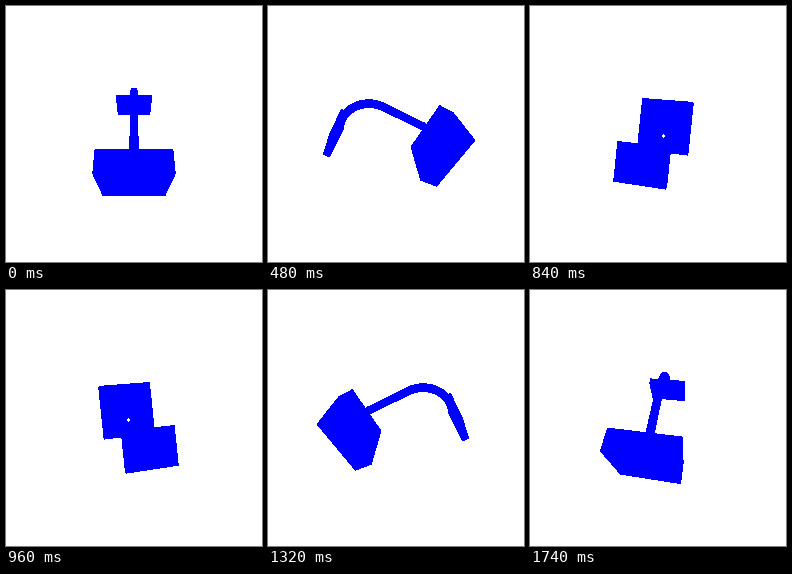
These frames come from a looping animation (256x256 px, 1.8 s). An HTML page:

```html
<!DOCTYPE html>
<html lang="en">
<head>
<meta charset="utf-8">
<title>Turning handle</title>
<style>
  html, body { margin: 0; width: 100%; height: 100%; overflow: hidden; background: #fff; }
  svg { display: block; width: 100vw; height: 100vh; }
</style>
</head>
<body>
<svg viewBox="0 0 256 256" shape-rendering="crispEdges" fill="#00f">
  <path id="block"/>
  <circle id="hole" fill="#fff"/>
  <path id="paddle"/>
  <g id="pipe" stroke="#00f" stroke-linecap="round"></g>
</svg>
<script>
const STEP = 60, STEPS = 30;
const RAD = Math.PI / 180;
const TILT = 30 * RAD, PERSPECTIVE = 0.0045, CENTER = 128;
const PIPE_RADIUS = 4, BEND = 28.2;
const $ = id => document.getElementById(id);

// Points are [depth, height, side]; depth faces the viewer at angle 0.
function project([u, w, v], angle) {
  const c = Math.cos(angle), s = Math.sin(angle);
  const x = v * c + u * s, near = u * c - v * s;
  const y = w * Math.cos(TILT) - near * Math.sin(TILT);
  const z = near * Math.cos(TILT) + w * Math.sin(TILT);
  const scale = 1 / (1 - PERSPECTIVE * z);
  return { x: CENTER + x * scale, y: CENTER - y * scale, scale };
}

// A box whose long side leans at 60 degrees in the depth/height plane.
function box(u, w, length, thickness, width) {
  const c = Math.cos(60 * RAD), s = Math.sin(60 * RAD);
  const corners = [];
  for (const i of [-0.5, 0.5]) for (const j of [-0.5, 0.5]) for (const k of [-0.5, 0.5]) {
    const along = i * length, across = j * thickness;
    corners.push([u + along * c - across * s, w + along * s + across * c, k * width]);
  }
  return corners;
}

function hull(points) {
  const sorted = [...points].sort((a, b) => a.x - b.x || a.y - b.y);
  const half = list => {
    const out = [];
    for (const p of list) {
      while (out.length > 1) {
        const a = out[out.length - 2], b = out[out.length - 1];
        if ((b.x - a.x) * (p.y - a.y) - (b.y - a.y) * (p.x - a.x) > 0) break;
        out.pop();
      }
      out.push(p);
    }
    return out.slice(0, -1);
  };
  return [...half(sorted), ...half(sorted.reverse())];
}

// A straight rod, a quarter bend, and a short end inside the paddle.
function pipePoints() {
  const points = [], start = [42, -1.4], bendStart = [-12, 29.8];
  for (let i = 0; i < 8; i++) {
    points.push(start.map((p, k) => p + (bendStart[k] - p) * i / 8));
  }
  const cu = bendStart[0] - BEND * 0.5, cw = bendStart[1] - BEND * 0.866;
  for (let i = 0; i <= 18; i++) {
    const a = (60 + i * 5) * RAD;
    points.push([cu + BEND * Math.cos(a), cw + BEND * Math.sin(a)]);
  }
  const [u, w] = points[points.length - 1];
  points.push([u - 3, w - 5.2]);
  return points.map(([u, w]) => [u, w, 0]);
}

const block = box(44.65, -14.9, 61.2, 20, 60);
const paddle = box(-58.3, 6, 31, 6.5, 41);
const pipe = pipePoints();
const segments = pipe.slice(1).map(() =>
  $('pipe').appendChild(document.createElementNS('http://www.w3.org/2000/svg', 'line')));

function drawBox(id, corners, angle) {
  const outline = hull(corners.map(p => project(p, angle)));
  $(id).setAttribute('d', 'M' + outline.map(p => p.x.toFixed(2) + ' ' + p.y.toFixed(2)).join('L') + 'Z');
}

function setAll(node, values) {
  for (const name in values) node.setAttribute(name, values[name]);
}

function draw(time) {
  const angle = Math.floor(time / STEP) % STEPS * 360 / STEPS * RAD;
  drawBox('block', block, angle);
  drawBox('paddle', paddle, angle);

  const spot = project([30.5, -20, 0], angle);
  setAll($('hole'), { cx: spot.x, cy: spot.y, r: Math.cos(angle) < -0.75 ? 1.6 : 0 });

  const path = pipe.map(p => project(p, angle));
  segments.forEach((line, i) => {
    const a = path[i], b = path[i + 1];
    setAll(line, {
      x1: a.x, y1: a.y, x2: b.x, y2: b.y,
      'stroke-width': PIPE_RADIUS * (a.scale + b.scale)
    });
  });
}

const began = performance.now();
function tick() {
  draw(performance.now() - began);
  requestAnimationFrame(tick);
}
tick();
</script>
</body>
</html>
```
